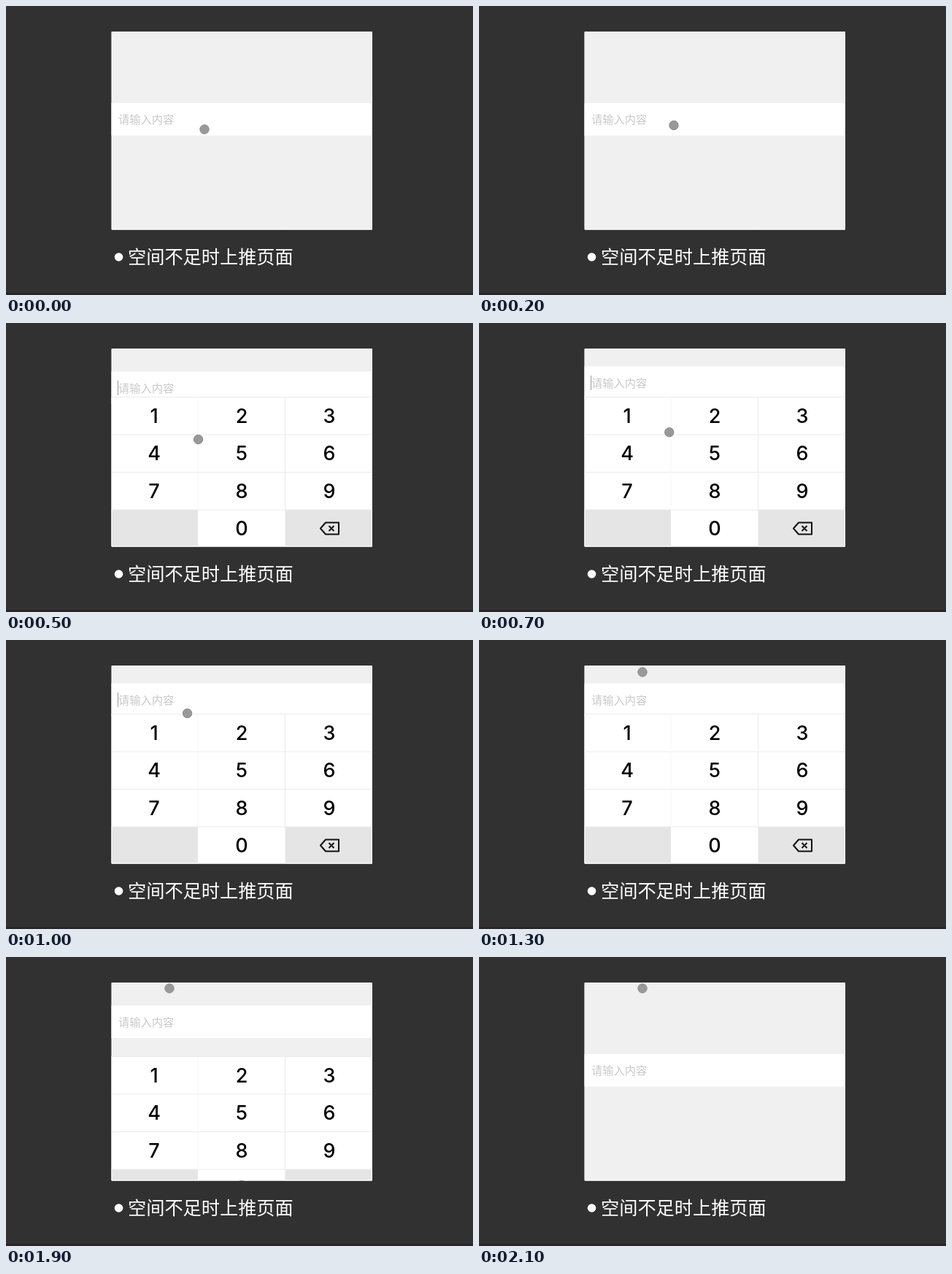
An HTML page for the animation above (2500 ms loop, 640x396 px).

```html
<!DOCTYPE html>
<html lang="zh-CN">
<head>
<meta charset="utf-8">
<title>空间不足时上推页面</title>
<style>
  html, body { margin: 0; width: 100%; height: 100%; overflow: hidden; background: #313131; }
  svg { display: block; }
  text { font-family: "Noto Sans CJK SC", "Noto Sans CJK", sans-serif; font-weight: 500; }
  .key { font: 500 27px Inter, Roboto, sans-serif; text-anchor: middle; }
</style>
</head>
<body>
<svg width="640" height="396" viewBox="0 0 640 396">
  <defs>
    <clipPath id="panel"><rect x="144.5" y="35" width="357.5" height="271.5" rx="1"/></clipPath>
  </defs>
  <rect width="640" height="396" fill="#313131"/>
  <rect y="393" width="640" height="3" fill="#2b2529"/>
  <g clip-path="url(#panel)">
    <rect x="144" y="35" width="358" height="272" fill="#f0f0f0"/>
    <g id="page">
      <rect x="144" y="133" width="358" height="44.5" fill="#fff"/>
      <text x="154" y="161" font-size="15.25" fill="#c9c9c9">请输入内容</text>
      <rect id="caret" x="153" y="145.5" width="1" height="20" fill="#999"/>
    </g>
    <g id="keys"></g>
    <rect x="145" y="35.5" width="356.5" height="270.5" fill="none" stroke="#fafafa"/>
  </g>
  <circle cx="154.5" cy="344" r="5.8" fill="#fff"/>
  <text x="167" y="353.3" font-size="25.2" fill="#fff">空间不足时上推页面</text>
  <circle id="pointer" r="6.2" fill="#999" stroke="#8a8a8a"/>
</svg>
<script>
const LOOP = 2500, STEP = 100;
const TOP = 101.5, ROW = 51.5, HEIGHT = 205;
const COLS = [144, 263, 382.5, 502];
const $ = id => document.getElementById(id);

// Keyframes are [time, ...values]
const PUSH = [[300, 0], [400, 10], [500, 66.5], [600, 73.5], [1800, 73.5], [1900, 66.5], [2000, 10], [2100, 0]];
const RISE = [[300, 0], [400, 52], [500, HEIGHT], [1800, HEIGHT], [1900, 170], [2000, 52], [2100, 0]];
const POINTER = [
  [0, 272, 169], [100, 270, 167], [300, 264, 160], [400, 263.5, 159.5], [600, 263.5, 159.5],
  [800, 258, 140], [1000, 248.5, 100.5], [1200, 232.5, 53], [1300, 224, 44], [1400, 224, 43]
];

function at(track, t) {
  const i = track.findIndex(k => k[0] > t);
  if (i < 0) return track[track.length - 1].slice(1);
  if (i === 0) return track[0].slice(1);
  const a = track[i - 1], b = track[i], p = (t - a[0]) / (b[0] - a[0]);
  return a.slice(1).map((v, n) => v + (b[n + 1] - v) * p);
}

function buildKeys() {
  let out = `<rect x="144" y="${TOP}" width="358" height="206" fill="#fff"/>`;
  ['1', '2', '3', '4', '5', '6', '7', '8', '9', '', '0', 'del'].forEach((label, i) => {
    const c = i % 3, y = TOP + Math.floor(i / 3) * ROW;
    if (label === '' || label === 'del')
      out += `<rect x="${COLS[c]}" y="${y}" width="${COLS[c + 1] - COLS[c]}" height="53" fill="#e5e5e5"/>`;
    if (label === 'del')
      out += `<path d="M431 281.5L438 273.5H456V289.5H438ZM442.5 278l7 7m0-7l-7 7"
        fill="none" stroke="#111" stroke-width="2" stroke-linejoin="round"/>`;
    else
      out += `<text class="key" x="${203 + c * 120}" y="${y + 35}">${label}</text>`;
  });
  for (let r = 0; r < 4; r++)
    out += `<path d="M144 ${TOP + r * ROW}H502" stroke="#ebebeb"/>`;
  out += `<path d="M263 ${TOP}V256" stroke="#f6f6f6"/><path d="M382.5 ${TOP}V256" stroke="#ebebeb"/>`;
  $('keys').innerHTML = out;
}

function draw(now) {
  const t = Math.floor(now % LOOP / STEP) * STEP;
  const [push] = at(PUSH, t), [rise] = at(RISE, t), [x, y] = at(POINTER, t);
  $('page').setAttribute('transform', `translate(0 ${-push})`);
  $('keys').setAttribute('transform', `translate(0 ${HEIGHT - rise})`);
  $('pointer').setAttribute('transform', `translate(${x} ${y})`);
  const caretOn = t >= 500 && t < 1900 && (t < 1100 || t >= 1600);
  $('caret').setAttribute('opacity', caretOn ? 1 : 0);
}

buildKeys();
const start = performance.now();
function frame() {
  draw(performance.now() - start);
  requestAnimationFrame(frame);
}
frame();
</script>
</body>
</html>
```
